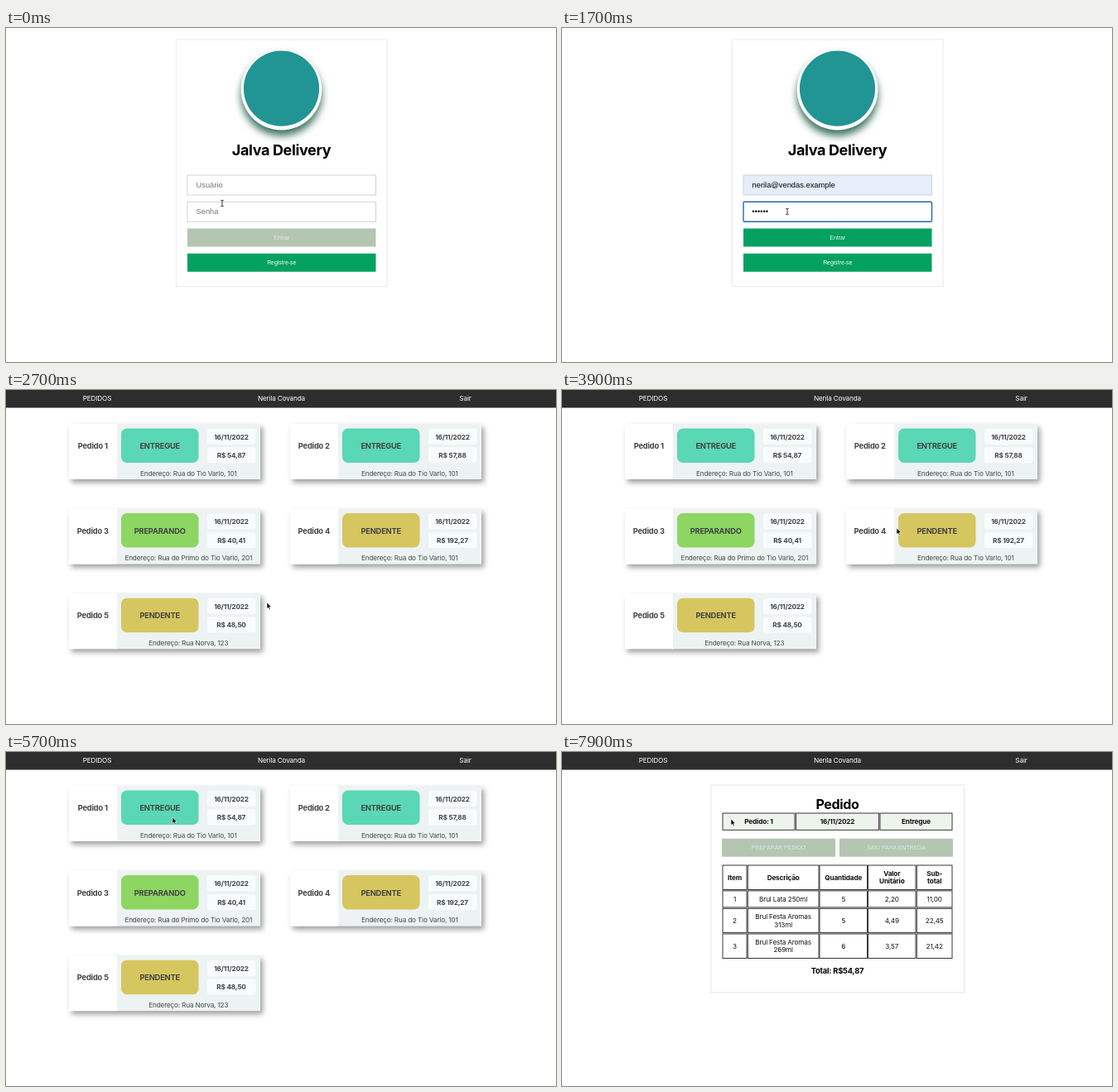
An HTML page for the animation above (8 s loop, 664x404 px).

```html
<!DOCTYPE html>
<html lang="pt-BR">
<head>
<meta charset="utf-8">
<title>Jalva Delivery</title>
<style>
  html, body { margin: 0; width: 100%; height: 100%; overflow: hidden; background: #fff; }
  svg { display: block; width: 664px; height: 404px; }
  text { font-family: Inter, sans-serif; letter-spacing: -.02em; white-space: pre; }
  .form { font-family: "Liberation Sans", Arial, sans-serif; letter-spacing: 0; }
  .card { filter: drop-shadow(3px 4px 3px rgba(0, 0, 0, .38)); }
  .logo { filter: drop-shadow(0 7px 5px rgba(30, 90, 70, .85)); }
</style>
</head>
<body>
<svg id="stage" viewBox="0 0 664 404"></svg>
<script>
const LOOP = 8000, STEP = 100;
const ORDERS_AT = 2600, DETAIL_AT = 5800;
const GREEN = '#04a161', DISABLED = '#b4c5b2', INK = '#444';
const EMAILS = ['covinha@um.example', 'nerila@vendas.example', 'adm@vendas.example'];
const ADDRESS = 'Rua do Tio Varlo, 101';

const rect = (x, y, w, h, fill, extra = '') =>
  `<rect x="${x}" y="${y}" width="${w}" height="${h}" fill="${fill}" ${extra}/>`;
const text = (x, y, size, content, { fill = '#111', weight = 400, anchor = 'middle', cls = '' } = {}) =>
  `<text x="${x}" y="${y}" font-size="${size}" fill="${fill}" font-weight="${weight}" text-anchor="${anchor}" class="${cls}">${content}</text>`;
const bold = (x, y, size, content, fill = '#000') => text(x, y, size, content, { fill, weight: 700 });
const button = (x, y, w, label, fill, ink) =>
  rect(x, y, w, 22, fill) + text(x + w / 2, y + 13.4, 6.9, label, { fill: ink, cls: 'form' });

// Cursor waypoints: time, x, y
const PATH = [
  [0, 261, 212], [100, 263, 194], [300, 263, 192], [500, 272, 214], [800, 282, 231], [1100, 282, 231],
  [1300, 272, 222], [2000, 272, 222], [2400, 315, 257], [3000, 315, 257], [3300, 180, 62],
  [3600, 154, 160], [3900, 404, 167], [4200, 472, 172], [4600, 238, 222], [4800, 418, 182],
  [5100, 274, 76], [5200, 274, 76], [5700, 201, 79], [6100, 201, 79], [6400, 264, 111],
  [6600, 405, 115], [6800, 326, 252], [7000, 302, 196], [7300, 326, 243], [7500, 326, 243], [7900, 204, 81]
];

function cursorAt(t) {
  const next = PATH.findIndex(p => p[0] > t);
  if (next < 0) return PATH[PATH.length - 1].slice(1);
  const [t0, x0, y0] = PATH[next - 1], [t1, x1, y1] = PATH[next];
  const k = (t - t0) / (t1 - t0), ease = k * k * (3 - 2 * k);
  return [x0 + (x1 - x0) * ease, y0 + (y1 - y0) * ease];
}

const ARROW = '<path d="M0 0V7.6L1.8 6 3 8.7 4.2 8.2 3 5.5H5.4Z" fill="#000" stroke="#fff" stroke-width=".6"/>';
const CURSORS = {
  arrow: ARROW,
  beam: '<path d="M-1.8-3.7Q0-3.7 0-2.7 0-3.7 1.8-3.7M0-2.7V2.7M-1.8 3.7Q0 3.7 0 2.7 0 3.7 1.8 3.7" fill="none" stroke="#222" stroke-width=".9"/>',
  hand: '<path d="M-1 0Q0-1 .8 0L1.4 3 3.5 3.3 4.3 4.2 4 6.5 3.2 8.5H-.4L-3 5.3Q-2.7 4-1 5.2Z" fill="#fff" stroke="#111" stroke-width=".8"/>',
  blocked: ARROW + '<g fill="#eee" stroke="#888" stroke-width="1"><circle cx="4.5" cy="11" r="3.6"/><path d="M2 8.5L7 13.5"/></g>'
};

function cursorKind(t, x, y) {
  if (t < ORDERS_AT) return t >= 2300 ? 'hand' : t >= 500 && t < 1200 ? 'arrow' : 'beam';
  const overButton = t >= DETAIL_AT && y > 105 && y < 127 && x > 193 && x < 472;
  return overButton || (t >= DETAIL_AT && t === 6400) ? 'blocked' : 'arrow';
}

function field(y, focused, filled, content) {
  const border = focused ? 'stroke="#2468b4" stroke-width="1.4" rx="1.5"' : 'stroke="#c8c8c8" stroke-width=".8"';
  return rect(219, y, 227.5, 24, filled ? '#e6eefc' : '#fff', border) + content;
}

function login(t, y) {
  const menu = t >= 500 && t < 1100;
  const hovered = Math.max(0, Math.floor((y - 209.5) / 18.6));
  const label = (base, s, fill = '#757575') => text(229.5, base, 9.33, s, { fill, anchor: 'start', cls: 'form' });
  const preview = text(229.5, 192.6, 6.9, EMAILS[hovered], { anchor: 'start' });
  const user = menu ? preview : t >= 1100 ? label(193, EMAILS[1], '#000') : label(193, 'Usuário');
  const typed = Math.max(0, Math.min(10, Math.floor((t - 1300) / 65)));
  let dots = '';
  for (let i = 0; i < typed; i++) dots += `<circle cx="${231 + i * 3.27}" cy="221.8" r="1.2"/>`;
  const enabled = typed >= 6;
  const enter = !enabled ? DISABLED : t >= 2300 ? '#42b585' : GREEN;

  let out = rect(205.5, 14, 254.5, 298.5, '#fff', 'stroke="#eee" stroke-width="1.4"')
    + '<circle class="logo" cx="332.5" cy="74.7" r="48.8" fill="#fff"/><circle cx="332.5" cy="73.2" r="45.6" fill="#219593"/>'
    + bold(332.5, 154, 18, 'Jalva Delivery')
    + field(178, t >= 300 && t < 1300, t >= 500, user)
    + field(210.3, t >= 1300 && t < 2400, false, typed ? dots : label(225.2, 'Senha'))
    + button(219, 242.5, 227.5, 'Entrar', enter, enabled ? '#e9f7f0' : '#e0e9df')
    + button(219, 272.8, 227.5, 'Registre-se', GREEN, '#fff');
  if (menu) {
    out += rect(269.5, 209.5, 98.5, 57, '#fff', 'style="filter:drop-shadow(0 1px 1px rgba(0,0,0,.3))"')
      + rect(269.5, 227.5 + (hovered - 1) * 18.5, 98.5, 18.5, '#e6e6e6')
      + EMAILS.map((s, i) => text(275.7, 220.5 + i * 18.5, 7.2, s, { anchor: 'start' })).join('');
  }
  return out;
}

const header = rect(0, 0, 664, 21.5, '#2d2d2d')
  + [[110, 'PEDIDOS'], [332.5, 'Nerila Covanda'], [554.5, 'Sair']]
    .map(([x, s]) => text(x, 13, 8.2, s, { fill: '#fff' })).join('');

const STATUS = { ENTREGUE: '#5ad7b5', PREPARANDO: '#8dd661', PENDENTE: '#d6c660' };
const ORDERS = [
  ['ENTREGUE', '54,87', ADDRESS], ['ENTREGUE', '57,88', ADDRESS],
  ['PREPARANDO', '40,41', 'Rua do Primo do Tio Varlo, 201'], ['PENDENTE', '192,27', ADDRESS],
  ['PENDENTE', '48,50', 'Rua Norva, 123']
];

const orders = header + ORDERS.map(([status, price, address], i) => {
  const chip = (y, s) => rect(167, y, 58.5, 19, '#f8fcfc', 'rx="3"') + bold(196, y + 12.7, 8.2, s, INK);
  return `<g transform="translate(${76 + i % 2 * 267} ${41 + Math.floor(i / 2) * 102.6})">`
    + rect(0, 0, 231, 67, '#edf3f3', 'class="card"') + rect(0, 0, 58, 67, '#fff')
    + bold(28.8, 30, 9.3, `Pedido ${i + 1}`, INK)
    + rect(63, 5.5, 93.5, 41.5, STATUS[status], 'rx="7"') + bold(109.7, 30, 9.3, status, INK)
    + chip(5.8, '16/11/2022') + chip(28.3, `R$ ${price}`)
    + text(144.3, 62.5, 8.2, `Endereço: ${address}`, { fill: INK }) + '</g>';
}).join('');

const COLUMNS = [[194, 29], [224.3, 85.7], [311, 57.5], [369.6, 57.4], [428.3, 42.7]];
const ROWS = [[137, 29.5], [167.9, 20], [189.3, 29.3], [220, 29.5]];
const TABLE = [
  ['Item', 'Descrição', 'Quantidade', 'Valor|Unitário', 'Sub-|total'],
  ['1', 'Brul Lata 250ml', '5', '2,20', '11,00'],
  ['2', 'Brul Festa Aromas|313ml', '5', '4,49', '22,45'],
  ['3', 'Brul Festa Aromas|269ml', '6', '3,57', '21,42']
];

function cell(x, y, w, h, content, weight, fill = '#fff') {
  const lines = content.split('|');
  return rect(x, y, w, h, fill, 'stroke="#222" stroke-width=".9"')
    + lines.map((s, i) => text(x + w / 2, y + h / 2 + 3 + (i - (lines.length - 1) / 2) * 9.3, 8.2, s, { weight })).join('');
}

const detail = header
  + rect(180, 40, 305.5, 251, '#fff', 'stroke="#f1f1f1" stroke-width="2"')
  + bold(332.5, 69, 16, 'Pedido')
  + cell(194, 74, 87, 20.3, 'Pedido: 1', 700, '#edf4ec')
  + cell(282.4, 74, 100.2, 20.3, '16/11/2022', 700, '#edf4ec')
  + cell(384, 74, 87, 20.3, 'Entregue', 700, '#edf4ec')
  + button(193, 104.7, 137, 'PREPARAR PEDIDO', DISABLED, '#e0e9df')
  + button(335, 104.7, 137, 'SAIU PARA ENTREGA', DISABLED, '#e0e9df')
  + TABLE.map((row, r) => row.map((s, c) =>
      cell(COLUMNS[c][0], ROWS[r][0], COLUMNS[c][1], ROWS[r][1], s, r ? 400 : 700)).join('')).join('')
  + bold(332.5, 267.6, 9.3, 'Total: R$54,87');

const stage = document.getElementById('stage');
let shown = -1;

function draw(now) {
  const t = Math.floor(now % LOOP / STEP) * STEP;
  if (t !== shown) {
    shown = t;
    const [x, y] = cursorAt(t);
    const page = t < ORDERS_AT ? login(t, y) : t < DETAIL_AT ? orders : detail;
    stage.innerHTML = page + `<g transform="translate(${x} ${y})">${CURSORS[cursorKind(t, x, y)]}</g>`;
  }
  requestAnimationFrame(draw);
}
draw(performance.now());
</script>
</body>
</html>
```
